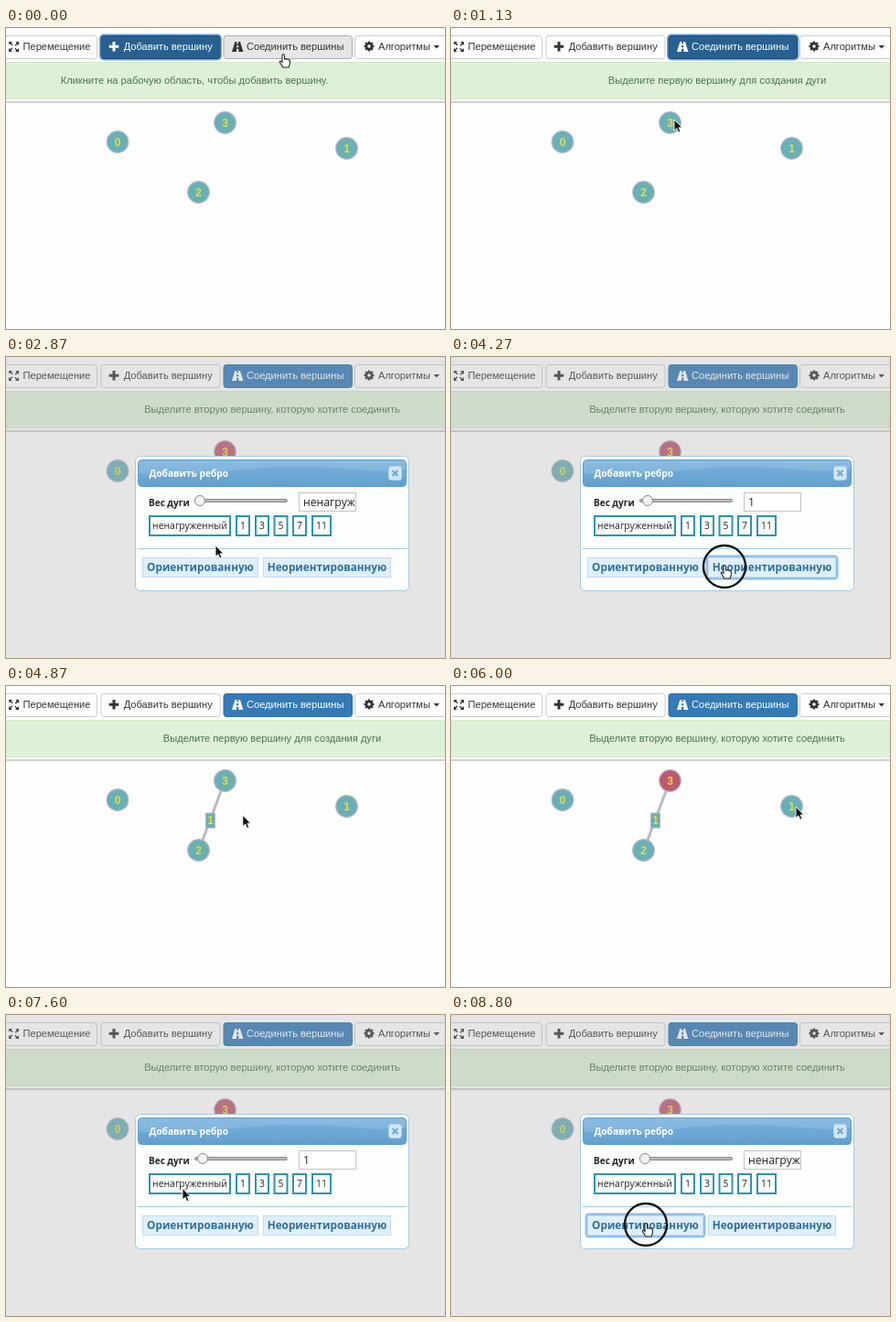
These frames come from a looping animation (480 px wide and 329 px high, 8.87 s). An HTML page:

```html
<!DOCTYPE html>
<html lang="ru">
<head>
<meta charset="utf-8">
<style>
html, body { margin: 0; width: 100%; height: 100%; overflow: hidden; background: #fff; }
svg { display: block; width: 480px; height: 329px; }
text { font: 11.1px "Liberation Sans", Arial, sans-serif; fill: #333; white-space: pre; }
.mid { text-anchor: middle; }
.msg { fill: #4a744b; }
.num { font-weight: bold; font-size: 12px; fill: #e6dc3c; text-anchor: middle; }
.ui { font: 10.4px "Open Sans", "Noto Sans", sans-serif; fill: #222; }
.ui.b { font-weight: bold; }
</style>
</head>
<body>
<svg id="stage" viewBox="0 0 480 329" xmlns="http://www.w3.org/2000/svg"></svg>
<script>
const LOOP = 8870;
const stage = document.getElementById('stage');
const $ = id => document.getElementById(id);

const rect = (x, y, w, h, fill, stroke = 'none', rx = 0, extra = '') =>
  `<rect x="${x}" y="${y}" width="${w}" height="${h}" rx="${rx}" fill="${fill}" stroke="${stroke}" ${extra}/>`;
const text = (x, y, s, cls = '', extra = '') => `<text x="${x}" y="${y}" class="${cls}" ${extra}>${s}</text>`;

const icons = {
  move: `<g id="icoMove" fill="#333"><path d="M3 15h4l-1.3 1.3 2 2-1 1-2-2L3.400 18.600zM14 15v4l-1.300-1.300-2 2-1-1 2-2L10.400 15zM3 26v-4l1.300 1.300 2-2 1 1-2 2L6.600 26zM14 26h-4l1.300-1.300-2-2 1-1 2 2L14 22z"/></g>`,
  plus: `<path d="M116.500 15h3v3.800h3.800v3h-3.800v3.800h-3v-3.800h-3.800v-3h3.800z"/>`,
  road: `<path d="M250.400 15h2v2.500h1.600V15h2l3.400 11h-5v-3.200h-2.400V26h-5zM252.200 19l-.2 2.300h2.400l-.2-2.300z" fill-rule="evenodd"/>`,
  cog: (() => {
    let teeth = '';
    for (let a = 0; a < 360; a += 45) teeth += rect(395.8, 14.500, 2.400, 3, '#333', 'none', 0, `transform="rotate(${a} 397 20)"`);
    return teeth + `<circle cx="397" cy="20" r="3" fill="none" stroke="#333" stroke-width="2.500"/>`;
  })()
};

const button = (id, x, w, label, tx, icon) => `<g id="${id}">
  ${rect(x - 1, 7.5, w + 2, 27, 'none', '#6fa9df', 4, 'class="glow" stroke-width="2"')}
  ${rect(x, 8.5, w, 25, '#fff', '#ccc', 3, 'class="face"')}
  <g class="ico">${icon}</g>${text(tx, 24.3, label, 'lbl')}</g>`;

const node = (id, x, y) => `<g><circle id="n${id}" cx="${x}" cy="${y}" r="11.800" fill="#68b0b8" stroke="#b9b4c4" stroke-width="1.300"/>
  ${text(x, y + 4.3, id, 'num')}</g>`;

const choice = (x, w, s) => rect(x + 1, 174, w - 2, 21, '#fff', '#2a93b8', 0, 'stroke-width="2"') +
  text(x + w / 2, 188, s, 'ui mid');

const action = (id, x, w, s) =>
  rect(x - 1, 218, w + 2, 24, 'none', '#8fc0ea', 3, `id="${id}" stroke-width="3"`) +
  rect(x + .5, 219.5, w - 1, 21, '#dfeffc', '#c5dbec') +
  text(x + w / 2, 234.300, s, 'ui b mid', 'style="font-size:11.750px;fill:#2e6e9e"');

const dialog = `<g id="dialog">
  ${rect(0, 0, 480, 329, '#aaa', 'none', 0, 'opacity=".3"')}
  ${rect(141.5, 108.5, 299, 147, '#fcfdfd', '#a6c9e2', 5)}
  ${rect(144.5, 112.5, 293, 29, 'url(#head)', '#5c9ccc', 4)}
  <path d="M145 127C205 133 250 121 310 120S400 128 437 123V116Q437 113 434 113H148Q145 113 145 116z" fill="#fff" opacity=".13"/>
  ${text(156.500, 131, 'Добавить ребро', 'ui b', 'style="font-size:10.200px;fill:#fff"')}
  ${rect(418.5, 119.5, 14, 15, '#d2e5f4', '#b4d3ea', 3)}
  <path d="M422.500 124l6 6m0-6l-6 6" stroke="#6da8d5" stroke-width="2"/>
  ${text(156, 163, 'Вес дуги', 'ui b', 'style="font-size:10px"')}
  ${rect(206.5, 155.5, 101, 3, '#bbb', '#888', 1.5)}
  <circle id="knob" cy="157" r="5.500" fill="#f3f3f3" stroke="#888"/>
  ${rect(320.5, 148.5, 62, 20, '#fff', '#c4c4c4')}
  <g clip-path="url(#field)">${text(325, 163, '', 'ui', 'id="value" style="font-size:12.200px"')}</g>
  ${choice(156, 90, 'ненагруженный')}
  ${choice(251, 16, '1')}${choice(272, 16, '3')}${choice(292.5, 16, '5')}${choice(313, 16, '7')}${choice(334, 22, '11')}
  <path d="M144 209.500H438" stroke="#a6c9e2"/>
  ${action('glowA', 149, 127, 'Ориентированную')}
  ${action('glowB', 281, 140, 'Неориентированную')}
</g>`;

stage.innerHTML = `<defs>
  <linearGradient id="head" x2="0" y2="1"><stop stop-color="#79b1dc"/><stop offset="1" stop-color="#62a0cf"/></linearGradient>
  <clipPath id="field">${rect(321, 149, 61, 19, '#000')}</clipPath></defs>
  ${rect(0, 0, 480, 329, '#fefefe')}
  ${button('move', -10.5, 110, 'Перемещение', 18.5, icons.move)}
  ${button('add', 104, 130, 'Добавить вершину', 128.7, icons.plus)}
  ${button('link', 238, 140.5, 'Соединить вершины', 263, icons.road)}
  ${button('algo', 381.5, 110, 'Алгоритмы', 407, icons.cog)}
  <path d="M467.500 19h6.500l-3.250 3.500z" fill="#333"/>
  ${rect(-2, 37.5, 484, 40, '#dff0d8', '#d6e9c6')}
  ${text(291, 61, '', 'msg mid', 'id="msg"')}
  <path d="M0 81H480" stroke="#bdbdbd" stroke-width="1.500"/>
  <g id="edge"><path d="M239.500 103L211 179" stroke="#bdb6c2" stroke-width="3"/>
    ${rect(218.5, 139, 10, 16, '#68b0b8', '#b9b4c4')}${text(223.5, 151.300, '1', 'num')}</g>
  ${node(0, 122, 124.500)}${node(1, 372.5, 131.500)}${node(2, 210.5, 179.500)}${node(3, 239.5, 103.500)}
  ${dialog}
  <circle id="ring" r="23" fill="none" stroke="#111" stroke-width="2.400"/>
  <path id="arrow" d="M0 0V12.300L2.900 9.700 4.800 14.200 7 13.300 5.100 8.900H8.800z" fill="#111" stroke="#fff" stroke-width=".9"/>
  <path id="hand" d="M0 1.200Q0-.3 1.200-.3T2.500 1.200V5Q3.600 4.200 4.600 5.200 5.800 4.600 6.600 5.700 8.400 5.400 8.400 7.200V9.800L7.200 14H.8L-2.600 8.600Q-2.900 7-1.500 7.200L0 8.600z" fill="#fff" stroke="#222" stroke-width="1.100"/>`;

// Pointer stops: time, x, y
const stops = [
  [0, 302, 29], [330, 302, 29], [900, 244, 100], [1330, 244, 100], [1750, 212, 181],
  [2200, 212, 181], [2700, 229, 206], [2930, 229, 206], [3250, 259, 185], [3480, 259, 185],
  [3900, 298, 228], [4470, 298, 228], [5100, 242, 104], [5350, 242, 104], [5870, 377, 132],
  [6220, 377, 132], [6450, 267, 181], [6650, 267, 181], [7150, 230, 212], [7300, 230, 212],
  [7720, 184, 184], [8000, 184, 184], [8450, 212, 228], [LOOP, 212, 228]
];
const presses = [[200, 330], [1200, 1300], [1800, 1950], [3320, 3440], [4190, 4380],
  [5180, 5300], [6060, 6180], [7800, 7930], [8590, LOOP]];

const inside = (t, a, b) => t >= a && t < b;

function pointer(t) {
  const i = stops.findIndex((s, k) => k && t < s[0]);
  const [t0, x0, y0] = stops[i - 1], [t1, x1, y1] = stops[i];
  const u = (t - t0) / (t1 - t0), e = u * u * (3 - 2 * u);
  return [x0 + (x1 - x0) * e, y0 + (y1 - y0) * e];
}

const skins = {
  plain: ['#fff', '#ccc', '#333'],
  hover: ['#e6e6e6', '#adadad', '#333'],
  active: ['#337ab7', '#2e6da4', '#fff'],
  focus: ['#286090', '#204d74', '#fff']
};
function paint(id, skin) {
  const [face, edge, ink] = skins[skin], g = $(id);
  const box = g.querySelector('.face');
  box.setAttribute('fill', face);
  box.setAttribute('stroke', edge);
  g.querySelector('.ico').setAttribute('fill', ink);
  g.querySelector('.lbl').style.fill = ink;
  show(g.querySelector('.glow'), skin === 'focus');
}
const show = (el, on) => el.setAttribute('visibility', on ? 'inherit' : 'hidden');

['move', 'algo'].forEach(id => paint(id, 'plain'));

function draw(t) {
  const [x, y] = pointer(t);
  const adding = t < 330;
  const picked = inside(t, 1300, 4470) || t >= 5270;
  const open = inside(t, 2070, 4470) || t >= 6240;
  const weighted = inside(t, 3440, 7930);
  const hand = y < 34 || (open && y > 219);

  paint('add', adding ? 'focus' : 'plain');
  paint('link', adding ? 'hover' : t < 2070 ? 'focus' : 'active');

  $('msg').textContent = adding ? 'Кликните на рабочую область, чтобы добавить вершину.'
    : picked ? 'Выделите вторую вершину, которую хотите соединить'
    : 'Выделите первую вершину для создания дуги';
  $('msg').setAttribute('x', adding ? 206 : 291);

  $('n3').setAttribute('fill', picked ? '#c0586f' : '#68b0b8');
  show($('edge'), t >= 4470);

  show($('dialog'), open);
  $('knob').setAttribute('cx', weighted ? 215 : 212);
  $('value').textContent = weighted ? '1' : 'ненагруж';
  show($('glowB'), inside(t, 4190, 4470));
  show($('glowA'), t >= 8590);

  show($('ring'), presses.some(([a, b]) => inside(t, a, b)));
  $('ring').setAttribute('transform', `translate(${x + 1} ${y + 1})`);
  show($('arrow'), !hand);
  show($('hand'), hand);
  for (const id of ['arrow', 'hand']) $(id).setAttribute('transform', `translate(${x} ${y})`);
}

const start = performance.now();
function tick() {
  draw((performance.now() - start) % LOOP);
  requestAnimationFrame(tick);
}
tick();
</script>
</body>
</html>
```
